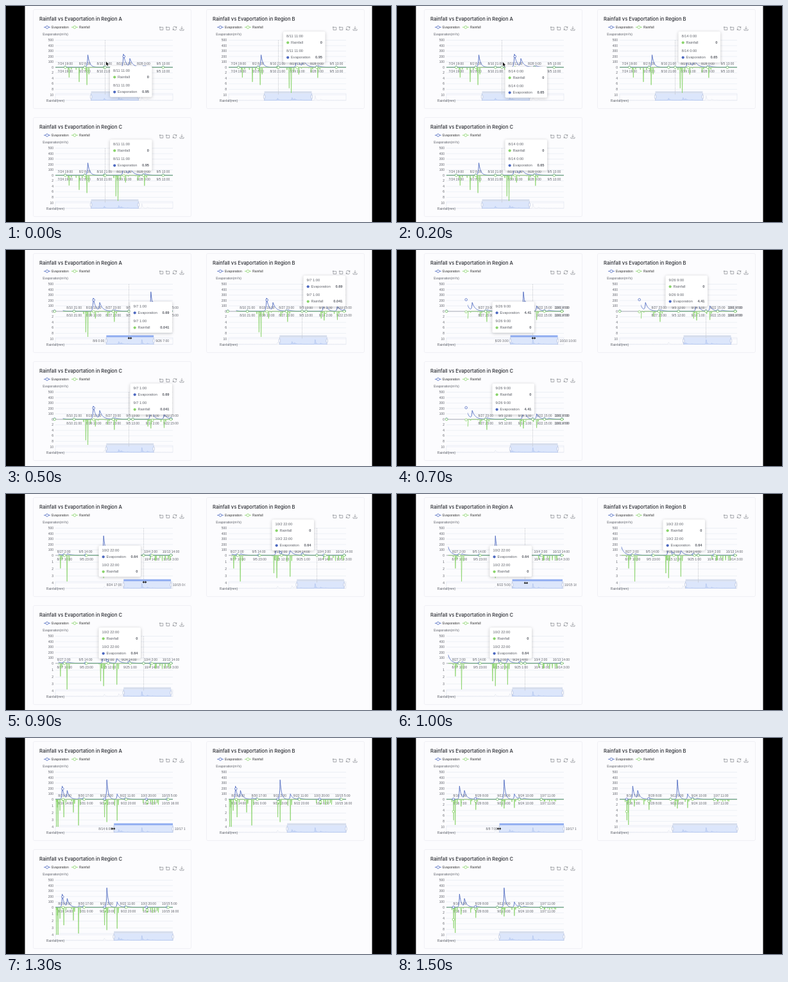
An HTML page with a canvas for the animation above (1600 ms loop, 600x338 px).

```html
<!DOCTYPE html>
<html lang="en">
<head>
<meta charset="utf-8">
<title>Linked rainfall charts</title>
<style>
html, body { margin: 0; width: 100%; height: 100%; overflow: hidden; background: #000; }
canvas { display: block; width: 600px; height: 338px; }
</style>
</head>
<body>
<canvas id="stage"></canvas>
<script>
const canvas = document.getElementById('stage');
const ctx = canvas.getContext('2d');
const ratio = window.devicePixelRatio || 1;
canvas.width = 600 * ratio;
canvas.height = 338 * ratio;

const LOOP = 1600, STEP = 100;
const LEFT = 77, RIGHT = 260, ZERO = 96, TOP = 53.5, BOTTOM = 139;
const BLUE = '#4d69c0', GREEN = '#8ad46b', GREY = '#5f626a', PAGE = '#fcfcfe';
const SANS = '"Liberation Sans", Arial, sans-serif';
const PANELS = [['A', 0, 0], ['B', 270, 0], ['C', 0, 169]];

// All times of the data are days counted from July 1.
const day = (month, date, hour = 0) =>
  (Date.UTC(2023, month - 1, date, hour) - Date.UTC(2023, 6, 1)) / 864e5;

function dateText(d) {
  const date = new Date(Date.UTC(2023, 6, 1, Math.round(d * 24)));
  return `${date.getUTCMonth() + 1}/${date.getUTCDate()} ${date.getUTCHours()}:00`;
}

function random(seed) {
  const s = Math.sin(seed * 12.9898) * 43758.5453;
  return s - Math.floor(s);
}

// Floods rise sharply and decay slowly: [day, height, decay].
const floods = [
  [33.7, 225, 0.8], [49.3, 240, 1], [52.1, 145, 1.3], [58.7, 25, 1.3],
  [74.5, 355, 0.8], [80.3, 95, 1.2], [85.6, 18, 1.5]
];
const flowAt = d => floods.reduce((sum, [peak, height, decay]) =>
  sum + height * Math.exp(d < peak ? (d - peak) / 0.25 : (peak - d) / decay), 4);

// Each storm is one main spike with two weaker ones near it: [day, depth].
const storms = [
  [25.5, 3.7], [29.9, 5.3], [33.3, 6.4], [46, 7.6], [46.9, 9.3], [50.2, 2.6],
  [55.6, 1.9], [58.5, 3.8], [73.2, 2.6], [74.5, 3.3], [80.3, 3.1]
];
const spikes = storms.flatMap(([d, depth], i) => [
  [d, depth],
  [d - 0.4 - random(i), depth * 0.3 * random(i + 20)],
  [d + 0.4 + random(i + 40), depth * (0.15 + 0.3 * random(i + 60))]
]);
for (let i = 0; i < 8; i++) spikes.push([95 + i * 1.2 + random(i), 0.3 + 0.5 * random(i + 9)]);
spikes.sort((a, b) => a[0] - b[0]);

const rainAt = d => Math.max(0, ...spikes.map(([s, depth]) => depth * (1 - Math.abs(d - s) / 0.25)));

// lo..hi: zoom window; view: left edge of the plot, which lags while dragging;
// zoom: pixels per day of the curves; slip: their offset; tip: date, rain, evaporation.
const SPAN = day(9, 26, 7) - day(8, 6);
const END = day(10, 17, 1);
const DAILY = SPAN / 6;
const poses = [
  { t: 0, lo: 19.5, view: 19.5, first: day(7, 24, 19), tipX: 162, cx: 156, cy: 87,
    tip: ['8/11 11:00', '0', '0.95'] },
  { t: 200, lo: 19.5, view: 19.5, first: day(7, 24, 19), tipX: 168.5, cx: 165, cy: 88,
    tip: ['8/14 0:00', '0', '0.65'] },
  { t: 500, lo: day(8, 6), view: 32.7, first: day(8, 10, 21), tipX: 193.5, cx: 193, cy: 138,
    tip: ['9/7 1:00', '0.041', '0.69'], evapFirst: 3, drag: true },
  { t: 700, lo: day(8, 20, 3), view: 40.8, first: day(8, 27, 23), tipX: 148.5, cx: 213, cy: 138,
    tip: ['9/26 9:00', '0', '4.41'], evapFirst: 1, drag: true },
  { t: 900, lo: day(8, 24, 17), view: 53.4, first: day(8, 27, 2), step: 9.5, skew: 8, max: 4,
    tipX: 144.5, cx: 216, cy: 138, tip: ['10/2 22:00', '0', '0.64'], evapFirst: 1, drag: true },
  { t: 1200, lo: day(8, 17, 5), hi: END, view: day(8, 17, 5), first: day(8, 19, 8), step: 11.375,
    skew: 6, max: 4, zoom: 2.76, cx: 171, cy: 142, drag: true },
  { t: 1500, lo: day(8, 8, 7), hi: END, view: day(8, 8, 7), first: day(8, 16, 7), step: 13.04,
    zoom: 2.76, slip: -10, cx: 159, cy: 142, drag: true }
].map(p => ({ hi: p.lo + SPAN, step: DAILY, max: 10, zoom: 3.56, slip: 0, evapFirst: 0, tipX: 144.5, ...p }));
const MOVING = ['lo', 'hi', 'view', 'zoom', 'slip', 'tipX', 'cx', 'cy'];

function poseAt(t) {
  const i = poses.findLastIndex(p => p.t <= t);
  const a = poses[i], b = poses[i + 1];
  const pose = { ...a };
  if (b) {
    const p = (t - a.t) / (b.t - a.t);
    for (const key of MOVING) pose[key] = a[key] + (b[key] - a[key]) * p;
  }
  return pose;
}

const flowY = v => ZERO - v * (ZERO - TOP) / 500;
const rainY = (depth, max) => Math.min(BOTTOM, ZERO + depth * (BOTTOM - ZERO) / max);
const sliderX = d => RIGHT - (END - d) / 0.695;

function text(s, x, y, { size = 5, color = GREY, align = 'left', weight = 400, family = SANS } = {}) {
  ctx.font = `${weight} ${size}px ${family}`;
  ctx.fillStyle = color;
  ctx.textAlign = align;
  ctx.textBaseline = 'middle';
  ctx.fillText(s, x, y);
}

function stroke(points, color, width = 0.6) {
  ctx.beginPath();
  points.forEach(p => ctx.lineTo(...p));
  ctx.strokeStyle = color;
  ctx.lineWidth = width;
  ctx.stroke();
}

function box(x, y, w, h, r, fill, line) {
  ctx.beginPath();
  ctx.roundRect(x, y, w, h, r);
  if (fill) { ctx.fillStyle = fill; ctx.fill(); }
  if (line) { ctx.strokeStyle = line; ctx.lineWidth = 0.6; ctx.stroke(); }
}

function circle(x, y, r, fill, line) {
  ctx.beginPath();
  ctx.arc(x, y, r, 0, 7);
  ctx.fillStyle = fill;
  ctx.fill();
  if (line) { ctx.strokeStyle = line; ctx.lineWidth = 0.8; ctx.stroke(); }
}
const ring = (x, y, color) => circle(x, y, 1.8, '#fff', color);

function clip(x, y, w, h, draw) {
  ctx.save();
  ctx.beginPath();
  ctx.rect(x, y, w, h);
  ctx.clip();
  draw();
  ctx.restore();
}

function toolbox() {
  const c = '#73767d';
  for (const x of [242, 252]) {
    stroke([[x - 2, 32], [x - 2, 37.5], [x + 2.7, 37.5], [x + 2.7, 33.3], [x - 3.2, 33.3]], c);
  }
  for (const start of [0.25, Math.PI + 0.25]) {
    ctx.beginPath();
    ctx.arc(263, 35, 2.9, start, start + 2.6);
    ctx.stroke();
  }
  for (const s of [1, -1]) {
    stroke([[263 + 2.9 * s, 35 - 3 * s], [263 + 2.6 * s, 35 - 0.7 * s], [263 + 0.7 * s, 35 - 1.2 * s]], c);
  }
  stroke([[274, 31.7], [274, 36.4]], c);
  stroke([[272.2, 34.6], [274, 36.4], [275.8, 34.6]], c);
  stroke([[271, 36], [271, 38.1], [277, 38.1], [277, 36]], c);
}

function header(name) {
  box(42.5, 5.5, 246, 155, 2, null, '#e8e8ee');
  text(`Rainfall vs Evaportation in Region ${name}`, 52, 20.5,
    { size: 7.65, weight: 500, color: '#2b2d33', family: 'Inter, Roboto, sans-serif' });
  [[59, BLUE, 'Evaporation'], [102, GREEN, 'Rainfall']].forEach(([x, color, label]) => {
    stroke([[x, 33.2], [x + 10, 33.2]], color, 0.9);
    circle(x + 5, 33.2, 2.1, '#fff', color);
    text(label, x + 12, 33.4, { color: '#333' });
  });
  toolbox();
  text('Evaporation(m³/s)', 77, 44.5, { align: 'center' });
}

function axes({ max }) {
  const gridLine = (label, y) => {
    stroke([[LEFT, y], [RIGHT, y]], '#e3e7f0');
    text(label, 74, y + 0.3, { align: 'right' });
  };
  for (let v = 0; v <= 500; v += 100) gridLine(v, flowY(v));
  const gap = max > 5 ? 2 : 1;
  for (let v = gap; v <= max; v += gap) gridLine(v, rainY(v, max));
  stroke([[LEFT, ZERO], [RIGHT, ZERO]], '#777b86');
}

// Calls draw(x, day) for the ticks of the upper (0) or lower (1) axis.
function ticks(pose, row, draw) {
  const scale = (RIGHT - LEFT) / (pose.hi - pose.lo);
  for (let i = -3; i < 9; i++) {
    const d = pose.first + i * pose.step;
    const x = LEFT + (d - pose.view) * scale;
    const delay = row && pose.skew ? (pose.skew + i) / 24 : 0;
    if (x > 75 && d <= pose.hi) draw(Math.min(257, x + delay * scale), d + delay);
  }
}

function slider(pose, hot) {
  const a = sliderX(pose.lo), b = sliderX(pose.hi);
  const shadow = [];
  for (let d = -20; d < END; d += 0.5) shadow.push([sliderX(d), 147.5 - flowAt(d) * 0.02]);
  box(LEFT, 137, RIGHT - LEFT, 10.8, 0.5, null, '#e0e5ef');
  stroke(shadow, '#dfe3ec');
  ctx.fillStyle = '#dce6fb';
  ctx.fillRect(a, 136.5, b - a, 11.3);
  clip(a, 136, b - a, 12, () => {
    stroke([...shadow, [RIGHT, 148], [LEFT, 148]], '#9cb4e8');
    ctx.fillStyle = '#c4d4f5';
    ctx.fill();
  });
  ctx.fillStyle = hot ? '#8eacf1' : '#d5dded';
  ctx.fillRect(a, 133.5, b - a, 3);
  for (const x of [a, b]) {
    stroke([[x, 136.5], [x, 148]], '#a9b8d8');
    box(x - 1.2, 139.5, 2.4, 5.2, 0.7, '#fff', '#a9b8d8');
  }
  text('Rainfall(mm)', 77, 148.3, { align: 'center' });
  if (hot) {
    clip(43, 130, 236.5, 25, () => {
      text(dateText(pose.lo), a - 3, 142.3, { align: 'right' });
      text(dateText(pose.hi), b + 3, 142.3);
    });
  }
}

function series(pose) {
  const origin = LEFT + pose.slip;
  const toX = d => origin + (d - pose.view) * pose.zoom;
  const toDay = x => pose.view + (x - origin) / pose.zoom;
  const rings = {
    flow: x => ring(x, flowY(flowAt(toDay(x))), BLUE),
    rain: x => ring(x, rainY(rainAt(toDay(x)), pose.max), GREEN)
  };

  [91, 102.2].forEach((y, row) => ticks(pose, row, (x, d) => {
    if (d >= pose.lo) text(dateText(d), x, y, { align: 'center' });
  }));

  const start = Math.max(LEFT, toX(pose.lo));
  clip(start, 50, RIGHT - start, 90, () => {
    ctx.lineJoin = 'round';
    const drops = spikes.flatMap(([d, depth]) => [
      [toX(d - 0.2), ZERO], [toX(d), rainY(depth, pose.max)], [toX(d + 0.2), ZERO]]);
    const curve = [];
    for (let d = 0; d < 125; d += 0.1) curve.push([toX(d), flowY(flowAt(d))]);
    stroke(curve, BLUE, 0.9);
    stroke([[LEFT, ZERO], ...drops, [RIGHT, ZERO]], GREEN, 0.8);
  });
  ticks(pose, 0, x => rings.flow(x + pose.slip));
  ticks(pose, 1, x => rings.rain(x + pose.slip));

  if (pose.tip) {
    const x = pose.cx - 1.5;
    ctx.setLineDash([1.5, 1]);
    stroke([[x, TOP], [x, BOTTOM]], '#b4b7bd');
    ctx.setLineDash([]);
    rings.flow(x);
    rings.rain(x);
  }
}

function tooltip(pose, index) {
  const x = pose.tipX;
  const y = index ? 40 : pose.drag ? 81 : pose.cy + 7;
  const [date, drop, evap] = pose.tip;
  const rows = [['Rainfall', drop, GREEN], ['Evaporation', evap, BLUE]];
  if (index < pose.evapFirst) rows.reverse();
  ctx.save();
  ctx.shadowColor = 'rgba(0,0,0,.22)';
  ctx.shadowBlur = 5 * ratio;
  ctx.shadowOffsetY = ratio;
  box(x, y, 65.5, 48.5, 2, '#fff');
  ctx.restore();
  rows.forEach(([label, value, color], i) => {
    const top = y + 7.3 + i * 23.3;
    text(date, x + 5, top, { size: 5.7 });
    circle(x + 7.2, top + 10, 2.1, color);
    text(label, x + 12, top + 10.1, { size: 5.7 });
    text(value, x + 61, top + 10.1, { size: 5.7, weight: 700, align: 'right' });
  });
}

function cursor({ cx, cy, drag }) {
  ctx.save();
  ctx.translate(cx, cy);
  ctx.fillStyle = '#111';
  ctx.lineJoin = 'round';
  if (drag) {
    stroke([[-2, 0], [2, 0]], '#111', 1.1);
    for (const s of [-1, 1]) {
      stroke([[3.2 * s, 0], [1.3 * s, -1.7], [1.3 * s, 1.7]], '#111', 0.3);
      ctx.fill();
    }
  } else {
    stroke([[0, 0], [0, 6], [1.4, 4.8], [2.4, 7], [3.3, 6.6], [2.4, 4.4], [4.2, 4.3], [0, 0]], '#fff', 1);
    ctx.fill();
  }
  ctx.restore();
}

function draw(now) {
  const pose = poseAt(Math.floor(now % LOOP / STEP) * STEP);
  ctx.setTransform(ratio, 0, 0, ratio, 0, 0);
  ctx.fillStyle = '#000';
  ctx.fillRect(0, 0, 600, 338);
  ctx.fillStyle = PAGE;
  ctx.fillRect(29.5, 0, 541, 338);
  PANELS.forEach(([name, dx, dy], index) => {
    ctx.save();
    ctx.translate(dx, dy);
    header(name);
    axes(pose);
    slider(pose, index === 0 && pose.drag);
    series(pose);
    if (pose.tip) tooltip(pose, index);
    ctx.restore();
  });
  cursor(pose);
}

const begin = performance.now();
function loop() {
  draw(performance.now() - begin);
  requestAnimationFrame(loop);
}
loop();
</script>
</body>
</html>
```
